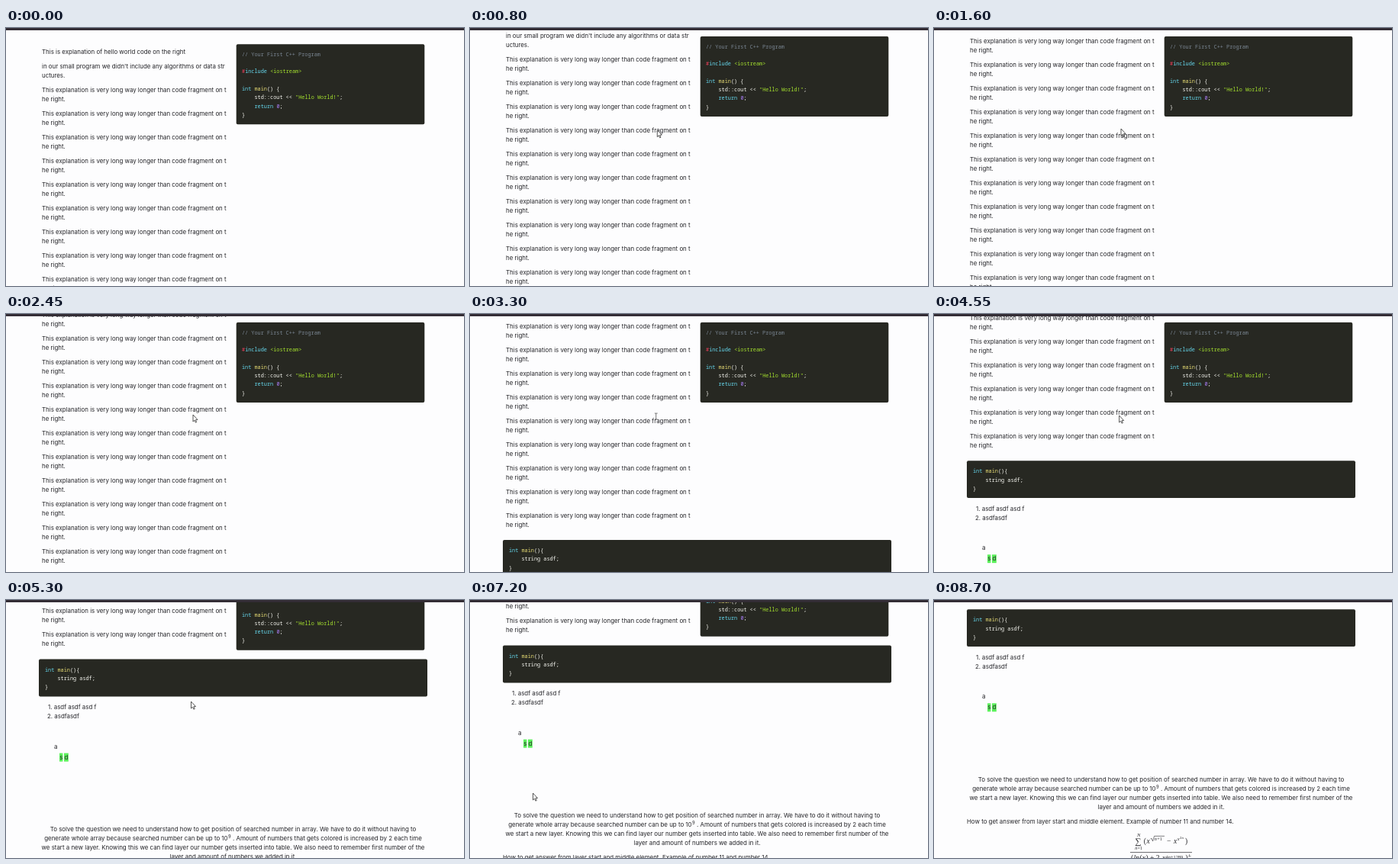
An HTML page with a canvas that plays this animation: 600 by 338 pixels, repeating every 8750 ms.

```html
<!DOCTYPE html>
<html lang="en">
<head>
<meta charset="utf-8">
<title>Scrolling article</title>
<style>
html, body { margin: 0; width: 100%; height: 100%; overflow: hidden; background: #fdfdfe; }
canvas { display: block; width: 600px; height: 338px; }
</style>
</head>
<body>
<canvas id="stage"></canvas>
<script>
const W = 600, H = 338, LOOP = 8750, STEP = 50;
const canvas = document.getElementById('stage');
const ctx = canvas.getContext('2d');
const dpr = window.devicePixelRatio || 1;
canvas.width = W * dpr;
canvas.height = H * dpr;

const SANS = '7.9px Inter, "Open Sans", sans-serif';
const SUP = '5.8px Inter, "Open Sans", sans-serif';
const MONO = '6.875px "Noto Sans Mono", "DejaVu Sans Mono", monospace';
const CHAR = 4.125;
const INK = '#242428';

// Wheel notches: start times, each moving the page by one notch
const NOTCH = 47.3, GLIDE = 200;
const notches = [650, 1250, 2250, 2900, 3750, 4150, 4493, 4840, 5184, 7400];

const C = {
  plain: '#f8f8f2', note: '#7b8794', key: '#66d9ef', str: '#a6e22e',
  fn: '#e6db74', num: '#ae81ff', hash: '#f0405c'
};
const mainCode = [
  [['// Your First C++ Program', C.note]],
  [],
  [['#', C.hash], ['include ', C.key], ['<iostream>', C.str]],
  [],
  [['int ', C.key], ['main', C.fn], ['() {', C.plain]],
  [['    std::cout << ', C.plain], ['"Hello World!"', C.str], [';', C.plain]],
  [['    ', C.plain], ['return ', C.key], ['0', C.num], [';', C.plain]],
  [['}', C.plain]]
];
const smallCode = [
  [['int ', C.key], ['main', C.fn], ['(){', C.plain]],
  [['    string asdf;', C.plain]],
  [['}', C.plain]]
];

// Pointer waypoints: time, x, y
const path = [
  [150, 300, 346], [550, 246, 140], [900, 244.5, 132], [2500, 244.5, 132],
  [2900, 242.5, 133], [5500, 242, 133], [6150, 39, 205], [6500, 32, 240],
  [7000, 82, 253], [7600, 82, 253], [8000, 110, 346]
];

const ease = u => u * u * (3 - 2 * u);
const clamp01 = u => Math.max(0, Math.min(1, u));

function scrollAt(t) {
  return notches.reduce((s, start) => s + NOTCH * ease(clamp01((t - start) / GLIDE)), 0);
}

function text(str, x, y, font = SANS, color = INK, align = 'left') {
  ctx.font = font;
  ctx.fillStyle = color;
  ctx.textAlign = align;
  ctx.fillText(str, x, y + 2.7);
}

function box(x, y, w, h, r, color) {
  ctx.fillStyle = color;
  ctx.beginPath();
  ctx.roundRect(x, y, w, h, r);
  ctx.fill();
}

function codeBox(x, y, w, h, lines, padX, padY) {
  box(x, y, w, h, 2, '#272822');
  lines.forEach((line, i) => {
    let cx = x + padX;
    for (const [str, color] of line) {
      text(str, cx, y + padY + i * 11.28, MONO, color);
      cx += str.length * CHAR;
    }
  });
}

function explanation() {
  text('This is explanation of hello world code on the right', 47, 31);
  text("in our small program we didn't include any algorithms or data str", 47, 50);
  text('uctures.', 47, 62);
  for (let i = 0; i < 13; i++) {
    const y = 81 + 31 * i;
    text('This explanation is very long way longer than code fragment on t', 47, y);
    text('he right.', 47, y + 12);
  }
}

function lists() {
  text('1. asdf asdf asd f', 55, 548);
  text('2. asdfasdf', 54, 560);
  text('a', 63, 599.7);
  ctx.fillStyle = '#5cf05c';
  ctx.fillRect(70, 608.3, 4.4, 11);
  ctx.fillRect(76, 608.3, 5.8, 11);
  text('s', 70.2, 613.7);
  text('d', 76.4, 613.7);
}

function lineWithPower(y) {
  const a = 'generate whole array because searched number can be up to 10';
  const b = ' . Amount of numbers that gets colored is increased by 2 each time';
  ctx.font = SUP;
  const wp = ctx.measureText('9').width + 0.6;
  ctx.font = SANS;
  const wa = ctx.measureText(a).width;
  const x = 297.5 - (wa + wp + ctx.measureText(b).width) / 2;
  text(a, x, y);
  text('9', x + wa + 0.4, y - 3.2, SUP);
  text(b, x + wa + wp, y);
}

function solution() {
  const mid = (str, y) => text(str, 297.5, y, SANS, INK, 'center');
  mid('To solve the question we need to understand how to get position of searched number in array. We have to do it without having to', 708);
  lineWithPower(720);
  mid('we start a new layer. Knowing this we can find layer our number gets inserted into table. We also need to remember first number of the', 732);
  mid('layer and amount of numbers we added in it.', 744);
  text('How to get answer from layer start and middle element. Example of number 11 and number 14.', 43, 763.3);
}

function formula() {
  const serif = (str, x, y, size, italic) =>
    text(str, x, y, `${italic ? 'italic ' : ''}${size}px "Liberation Serif", "Noto Serif", serif`, INK);
  ctx.strokeStyle = INK;
  ctx.lineWidth = 0.6;
  serif('N', 266, 779.8, 6.6, true);
  serif('∑', 263.6, 789.8, 11.5);
  serif('n', 263.2, 797.4, 6, true);
  serif('=1', 266.5, 797.4, 6);
  serif('(', 274.8, 789.6, 9.5);
  serif('x', 278.5, 789.6, 9.5, true);
  serif('n', 288.7, 785.6, 6.3, true);
  serif('+1', 292.2, 785.6, 6.3);
  ctx.beginPath();
  ctx.moveTo(283.6, 786);
  ctx.lineTo(285, 785.3);
  ctx.lineTo(286.6, 789);
  ctx.lineTo(288.6, 782.3);
  ctx.lineTo(302, 782.3);
  ctx.stroke();
  serif('−', 305, 789.6, 9.5);
  serif('x', 314, 789.6, 9.5, true);
  serif('x', 318.8, 785.4, 6.3, true);
  serif('2', 322, 783, 4.8);
  serif('n', 324.6, 783, 4.8, true);
  serif(')', 329, 789.6, 9.5);
  ctx.fillStyle = INK;
  ctx.fillRect(257, 803.4, 81, 0.7);
  serif('(', 258, 811.4, 9.5);
  serif('ln', 261.5, 811.4, 9.5, true);
  serif('(', 269.4, 811.4, 9.5);
  serif('x', 272.8, 811.4, 9.5, true);
  serif(') + 2', 277.4, 811.4, 9.5);
  serif('x', 299, 811.4, 9.5, true);
  serif('4', 303.6, 809.4, 6.3);
  serif('n', 306.8, 809.4, 6.3, true);
  serif('+1289', 310, 809.4, 6.3);
  serif(')', 329.6, 811.4, 9.5);
  serif('1', 333.6, 806.4, 4.8);
  ctx.fillRect(333.2, 808.6, 3.4, 0.5);
  serif('2', 333.6, 811.4, 4.8);
}

function pointerAt(t) {
  for (let i = 1; i < path.length; i++) {
    const [t0, x0, y0] = path[i - 1], [t1, x1, y1] = path[i];
    if (t >= t0 && t < t1) {
      const u = ease((t - t0) / (t1 - t0));
      return [x0 + (x1 - x0) * u, y0 + (y1 - y0) * u];
    }
  }
  return null;
}

function arrow(x, y) {
  const pts = [[0, 0], [0, 9], [2, 7.2], [3.4, 10.2], [4.7, 9.6], [3.4, 6.7], [6, 6.5]];
  ctx.beginPath();
  pts.forEach(([dx, dy]) => ctx.lineTo(x + dx + 0.5, y + dy));
  ctx.closePath();
  ctx.fillStyle = '#fff';
  ctx.fill();
  ctx.strokeStyle = '#222';
  ctx.lineWidth = 0.75;
  ctx.stroke();
}

function beam(x, y) {
  ctx.fillStyle = '#555';
  ctx.fillRect(x - 0.4, y - 4, 0.8, 8);
  ctx.fillRect(x - 2, y - 4.3, 4, 0.7);
  ctx.fillRect(x - 2, y + 3.6, 4, 0.7);
}

function draw(t) {
  const s = scrollAt(t);
  ctx.setTransform(dpr, 0, 0, dpr, 0, 0);
  ctx.fillStyle = '#fdfdfe';
  ctx.fillRect(0, 0, W, H);

  ctx.save();
  ctx.translate(0, -s);
  explanation();
  codeBox(43, 485.3, 509, 48.8, smallCode, 8, 13.4);
  lists();
  solution();
  formula();
  ctx.restore();

  // Sticky until its column ends
  const top = Math.min(Math.max(21.2 - s, 11), 368.5 - s);
  codeBox(301.7, top, 246.6, 105, mainCode, 7.3, 13);

  ctx.fillStyle = '#332d35';
  ctx.fillRect(0, 0, W, 3);

  const p = pointerAt(t);
  if (!p) return;
  if (t >= 3100 && t < 3950) beam(p[0] + 1.3, p[1] + 1);
  else arrow(p[0], p[1]);
}

function frame() {
  const t = performance.now() % LOOP;
  draw(Math.floor(t / STEP) * STEP);
  requestAnimationFrame(frame);
}
frame();
</script>
</body>
</html>
```
